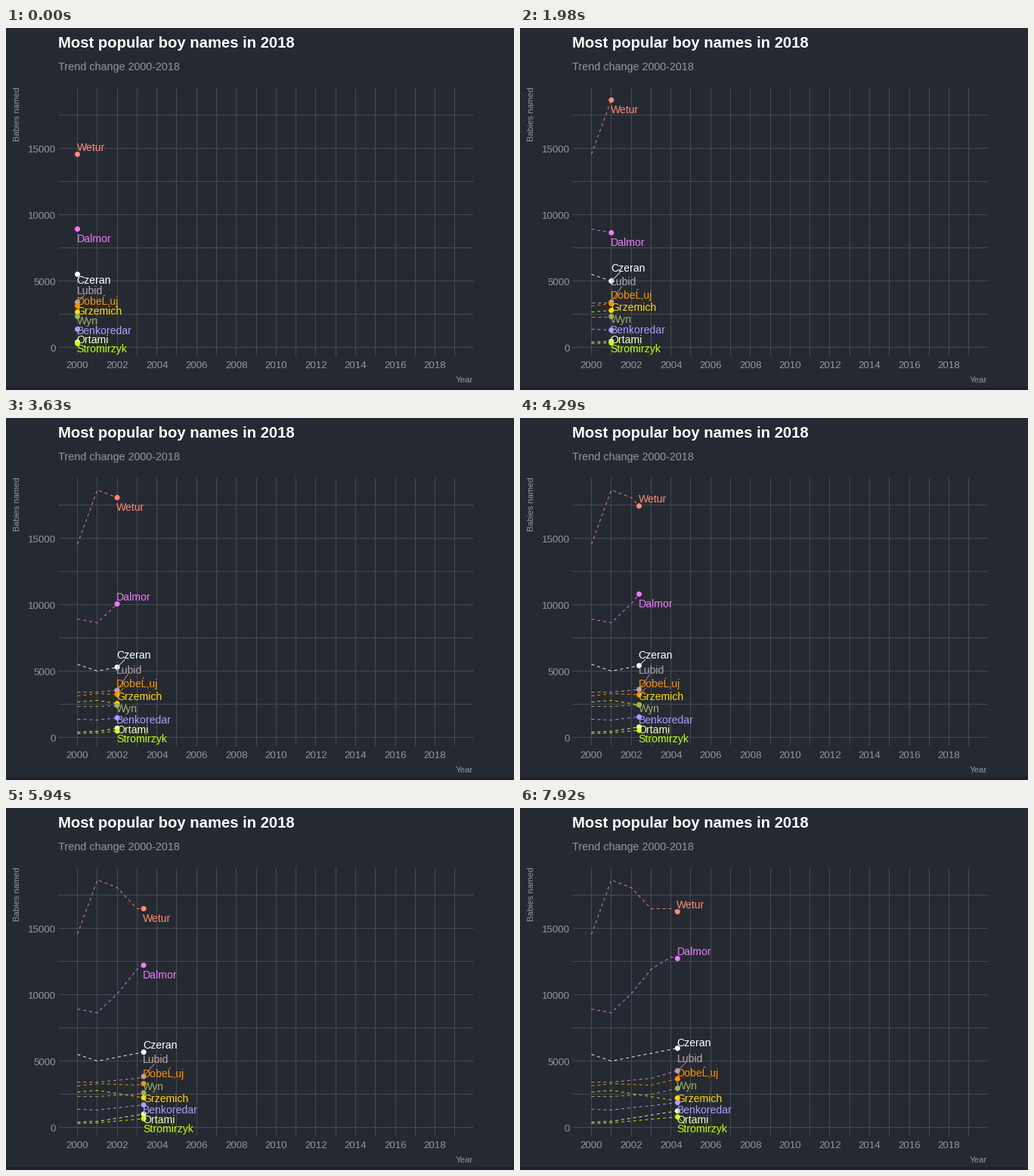
A matplotlib script for the animation above (8 s loop, 672x480 px).

```python
import math
import random

import matplotlib.pyplot as plt
import numpy as np
from matplotlib.animation import FuncAnimation
from matplotlib.collections import LineCollection
from matplotlib.patches import Rectangle

W, H, DPI = 672, 480, 100
PX = 72 / DPI
STEP, TICK, LOOP = 330, 20, 8000
BG, GRID, MUTED = "#252a32", "#464950", "#92979d"
LEFT, RIGHT, TOP, BOTTOM = 69, 618, 79, 434

# name, colour, babies named at the turning points (years after 2000)
SERIES = [
    ("Wetur", "#ff8c75",
     {0: 14490, 1: 18580, 2: 18010, 3: 16420, 4: 16420, 5: 15740}),
    ("Dalmor", "#f07af8", {0: 8860, 1: 8580, 2: 10000, 3: 11850, 4: 12780, 5: 12440}),
    ("Czeran", "#ffffff", {0: 5450, 1: 4940, 5: 6100}),
    ("Lubid", "#b8a6a8", {0: 3350, 1: 3350, 3: 3640, 5: 4490}),
    ("Dobe\u0139\u201auj", "#ff9100", {0: 3070, 1: 3240, 3: 3120, 5: 3850}),
    ("Grzemich", "#ffd900", {0: 2610, 1: 2730, 4: 2020, 5: 2440}),
    ("Wyn", "#9fb165", {0: 2270, 1: 2270, 3: 2440, 5: 3100}),
    ("Benkoredar", "#b09cff", {0: 1310, 1: 1250, 5: 1920}),
    ("Ortami", "#f3ffb8", {0: 340, 1: 400, 5: 1340}),
    ("Stromirzyk", "#c0ff00", {0: 230, 1: 280, 5: 830}),
]
YEAR_STEPS = [round(5.5 * k) for k in range(6)]


def x_of(year):
    return 94.05 + 26.28 * year


def y_of(count):
    return 423 - 0.0176 * count


def height(points, year):
    return y_of(np.interp(year, list(points), list(points.values()))) - 0.5


def hop(step, period, shift):
    """Offset of a free label, which jumps above its dot now and then."""
    return -9.5 if (step + shift) % period < 3 else 12.5


def label_heights(step, ys):
    """Two free labels; the others are stacked upwards in order of their dots."""
    out = [ys[0] + hop(step, 12, 0), ys[1] + hop(step, 15, 6)] + [0] * (len(ys) - 2)
    jitter = random.Random(step).uniform(-0.1, 0.1)
    spread = 1.4 * (1 - math.exp(-(step + 1) / 5)) + jitter
    cy = 425
    for rank, i in enumerate(sorted(range(2, len(ys)), key=lambda i: -ys[i])):
        out[i] = cy
        cy -= 12 + spread * rank
    return out


plt.rcParams["font.family"] = "Liberation Sans"
fig = plt.figure(figsize=(W / DPI, H / DPI), dpi=DPI, facecolor=BG)
ax = fig.add_axes([0, 0, 1, 1])
ax.set_xlim(0, W)
ax.set_ylim(H, 0)
ax.axis("off")


def put(x, y, text, size, color=MUTED, **kw):
    return ax.text(x, y, text, fontsize=size * PX, color=color, **kw)


ax.add_patch(Rectangle((0, 476), W, 4, color="#211f2b", lw=0))
grid = [[(x_of(k), TOP), (x_of(k), BOTTOM)] for k in range(20)]
grid += [[(LEFT, y_of(v)), (RIGHT, y_of(v))] for v in range(0, 17501, 2500)]
ax.add_collection(LineCollection(grid, colors=GRID, linewidths=PX, zorder=1))

put(LEFT, 26, "Most popular boy names in 2018", 20.3, "white", weight="bold")
put(LEFT, 56, "Trend change 2000-2018", 14.4)
put(RIGHT, 470, "Year", 11.5, ha="right")
put(15, 114, "Babies named", 11.2, rotation=90, ha="center", va="center")
for k in range(0, 19, 2):
    put(x_of(k) + 0.5, 451, str(2000 + k), 13.3, ha="center")
for v in range(0, 15001, 5000):
    put(66, y_of(v) + 6, str(v), 13.3, ha="right")

trails, leaders, labels = [], [], []
for name, color, _ in SERIES:
    trails.append(ax.plot([], [], color=color, lw=0.9 * PX, dashes=(4.4, 4.4),
                          dash_capstyle="butt", zorder=2)[0])
    leaders.append(ax.plot([], [], color=color, lw=0.8 * PX, zorder=4)[0])
    labels.append(put(0, 0, name, 14, color, zorder=5))
dots = ax.scatter([0] * len(SERIES), [0] * len(SERIES), s=(7 * PX) ** 2,
                  c=[color for _, color, _ in SERIES], linewidths=0, zorder=3)


def leader(x, y, cy):
    """Slanted connector, only when the label is far enough from its dot."""
    gap = abs(cy - y) - 6
    if gap < 8:
        return [], []
    return [x, x + min(gap, 14)], [y, y + math.copysign(gap, cy - y)]


def draw(frame):
    step = int((frame * TICK + TICK / 2) // STEP)
    year = np.interp(step, YEAR_STEPS, range(6))
    years = np.append(np.arange(math.floor(year) + 1), year)
    xs = x_of(years) + 0.45
    paths = [height(points, years) for _, _, points in SERIES]
    ys = [path[-1] for path in paths]
    x = xs[-1]
    for i, cy in enumerate(label_heights(step, ys)):
        trails[i].set_data(xs, paths[i])
        leaders[i].set_data(*leader(x, ys[i], cy))
        labels[i].set_position((x - 1, cy + 5))
    dots.set_offsets(np.column_stack([[x] * len(ys), ys]))
    return trails + leaders + labels + [dots]


anim = FuncAnimation(fig, draw, frames=LOOP // TICK, interval=TICK,
                     repeat=True, repeat_delay=0, cache_frame_data=False)
plt.show()
```
